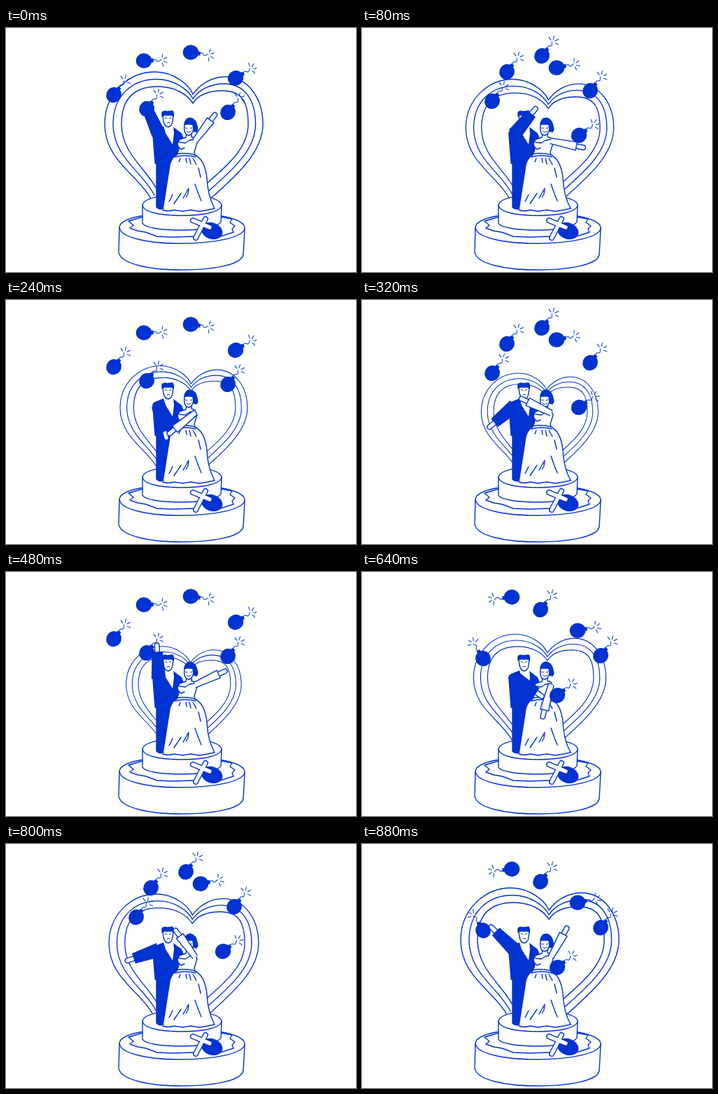
An HTML page that plays this animation: 500x350 px, repeating every 960 ms.

```html
<!DOCTYPE html>
<html lang="en">
<head>
<meta charset="utf-8">
<title>Wedding cake</title>
<style>
  html, body { margin: 0; width: 100%; height: 100%; overflow: hidden; background: #fff; }
  svg { display: block; width: 100%; height: 100%; }
  .line { fill: none; stroke: #0033cf; stroke-width: 1.4; stroke-linecap: round; stroke-linejoin: round; }
  .paper { fill: #fff; }
  .ink { fill: #0033cf; }
  .thin { stroke-width: 1; }
  .limb { stroke-width: 8; }
  .limb + .limb { stroke: #fff; stroke-width: 5.2; }
</style>
</head>
<body>
<svg viewBox="0 0 500 350">
  <g id="heart" class="line"></g>

  <g id="cake" class="line">
    <path class="paper" d="M162 286C163 272 205 265 251 265S341 273 341 287L339 325C336 340 296 347 251 347S163 339 161 321Z"/>
    <path d="M162 286C163 300 200 309 250 309S340 300 341 287"/>
    <path d="M195 271L175 277L182 283L177 287L188 291L200 293L216 299L238 300L268 299M307 271L323 274L320 279L327 284L323 288L325 293L303 300"/>
    <path class="paper" d="M195 254C196 245 220 239 251 239S307 245 308 254L307 278C303 286 280 290 250 290S198 286 195 280Z"/>
    <path d="M195 254C196 264 220 269 251 269S307 264 308 254"/>
  </g>

  <g id="groom" class="line">
    <path class="ink" d="M225 142L213 147Q209 149 210 154L213 194L215 195L215 257Q219 261 224 259L229 225L235 191L246 182L246 168L253 160Q252 151 247 149L238 142Z"/>
    <path class="paper" stroke="none" d="M225 141L239 141L240 151L238 167L228 151Z"/>
    <path class="paper" d="M224 125L225 134Q227 142 232 142Q237 141 238 134L239 125Z"/>
    <path class="ink" d="M223 127L223 121Q226 118 230 120L238 119Q240 122 239 127L237 124L226 124Z"/>
    <path class="thin" d="M227 128L230 130M233 130L236 128M230 136Q232 134 234 136"/>
  </g>

  <g id="bride" class="line">
    <path class="paper" d="M258 151L257 157L248 160L245 166L247 174L244 182Q234 187 233 203Q228 235 224 261Q232 264 240 261L252 263L264 261L276 263L288 261L298 259Q288 240 287 215Q284 189 270 182L269 178L273 165L270 158L265 156L265 151Z"/>
    <path d="M248 164L256 165L262 161L269 160M246 170L250 174L255 172M243 181Q256 178 270 182M242 185Q256 181 271 185"/>
    <path d="M249 187L247 192M257 187L258 193M262 187L264 195M267 187L272 196M275 201L278 214M238 239L233 249M250 237L240 252M253 244L261 230L260 238L257 243M270 224L275 238L279 248"/>
    <path class="paper" d="M255 138Q253 153 261 154Q269 152 268 138Z"/>
    <path class="ink" d="M255 139Q255 130 263 129Q271 130 273 141Q275 146 272 149L268 148L267 139Q261 135 255 139Z"/>
    <path class="thin" d="M256 143L259 144M263 144L266 143M258 148Q261 151 265 148"/>
  </g>

  <g id="arms" class="line"></g>
  <g id="bombs" class="line"></g>

  <g id="cross" class="line">
    <ellipse class="ink" rx="15" ry="11" transform="translate(294 291) rotate(20)"/>
    <path class="limb" d="M285 274L271 301M267 276L291 286"/>
    <path class="limb" d="M285 274L271 301M267 276L291 286"/>
  </g>
</svg>
<script>
const STEP = 80, STEPS = 12, LOW = 5;
const $ = id => document.getElementById(id);
const polar = (x, y, deg, r) => [x + r * Math.cos(deg * Math.PI / 180), y + r * Math.sin(deg * Math.PI / 180)];

// One outline of the heart; k = 0 is the outermost.
function ring(k) {
  const l = 141 + 12 * k, r = 367 - 10.5 * k, t = 63 + 10.5 * k, u = 70 + 10 * k, n = 82 + 6 * k;
  return `<path d="M${207 + 5 * k} ${245 - 5 * k}C${190 + 7 * k} ${212 - 4 * k} ${l} ${190 - 4 * k} ${l} 138
    C${l} ${94 + 3 * k} ${175 + 5 * k} ${t} ${213 + 2 * k} ${t}
    C240 ${t} ${262 - 2 * k} ${n} 267 ${95 + 6.5 * k}
    C276 ${n} 293 ${u} ${313 - 2 * k} ${u}
    C${345 - 4 * k} ${u} ${r} ${100 + 3 * k} ${r} 138
    C${r} ${178 - 2 * k} ${329 - 8 * k} ${212 - 6 * k} ${293 - 6 * k} ${244 - 8 * k}"/>`;
}
$('heart').innerHTML = [0, 1, 2].map(ring).join('');

// An arm turning about its shoulder, with a tapered sleeve over the hand.
function arm(x, y, deg, near, far, fill) {
  const wrist = polar(x, y, deg, 37), hand = polar(x, y, deg, 47);
  const corner = ([px, py], w) => polar(px, py, deg + 90, w).join(' ');
  const skin = `<path class="limb" d="M${wrist}L${hand}"/>`;
  return `${skin}${skin}<path class="${fill}" d="M${corner([x, y], near)}L${corner(wrist, far)}
    L${corner(wrist, -far)}L${corner([x, y], -near)}"/>`;
}

// The juggling path: x, y and, where it is not the usual one, the fuse angle.
const FUSE = -52;
const path = [
  [201, 116], [186, 105], [173, 124, -122], [154, 96], [207, 63], [214, 36, 174],
  [197, 47, -2], [257, 40], [255, 54], [264, 35, 8], [278, 57, -11], [308, 84, -11],
  [328, 72, -32], [326, 90], [341, 120], [317, 121], [310, 154, -36], [279, 177, -38]
];
let rays = '';
for (let a = -75; a <= 75; a += 50) rays += `M${polar(25, 0, a, 4)}L${polar(25, 0, a, 9)}`;

const bomb = ([x, y, turn = FUSE]) => `<g transform="translate(${x} ${y}) rotate(${turn})">
  <ellipse class="ink" rx="10.6" ry="10"/><path class="ink" d="M9 -2H13V2H9Z"/>
  <path class="thin" d="M13 0Q16 -3 18 0T22 1T25 -1${rays}"/></g>`;

function draw(step) {
  const away = step <= LOW ? step / LOW : (STEPS - 1 - step) / (STEPS - 1 - LOW);
  const size = 1 - 0.326 * away;
  $('heart').setAttribute('transform', `translate(253.5 224) scale(${size}) translate(-253.5 -224)`);
  $('arms').innerHTML = arm(218, 152, 246 + 63.5 * step, 9.5, 7, 'ink')
    + arm(270, 162, 64.7 * step - 53, 4, 6, 'paper');
  $('bombs').innerHTML = path.filter((_, i) => i % 3 === step % 3).map(bomb).join('');
}

const start = performance.now();
let shown = -1;
function tick() {
  const step = Math.floor((performance.now() - start) / STEP) % STEPS;
  if (step !== shown) draw(shown = step);
  requestAnimationFrame(tick);
}
tick();
</script>
</body>
</html>
```
